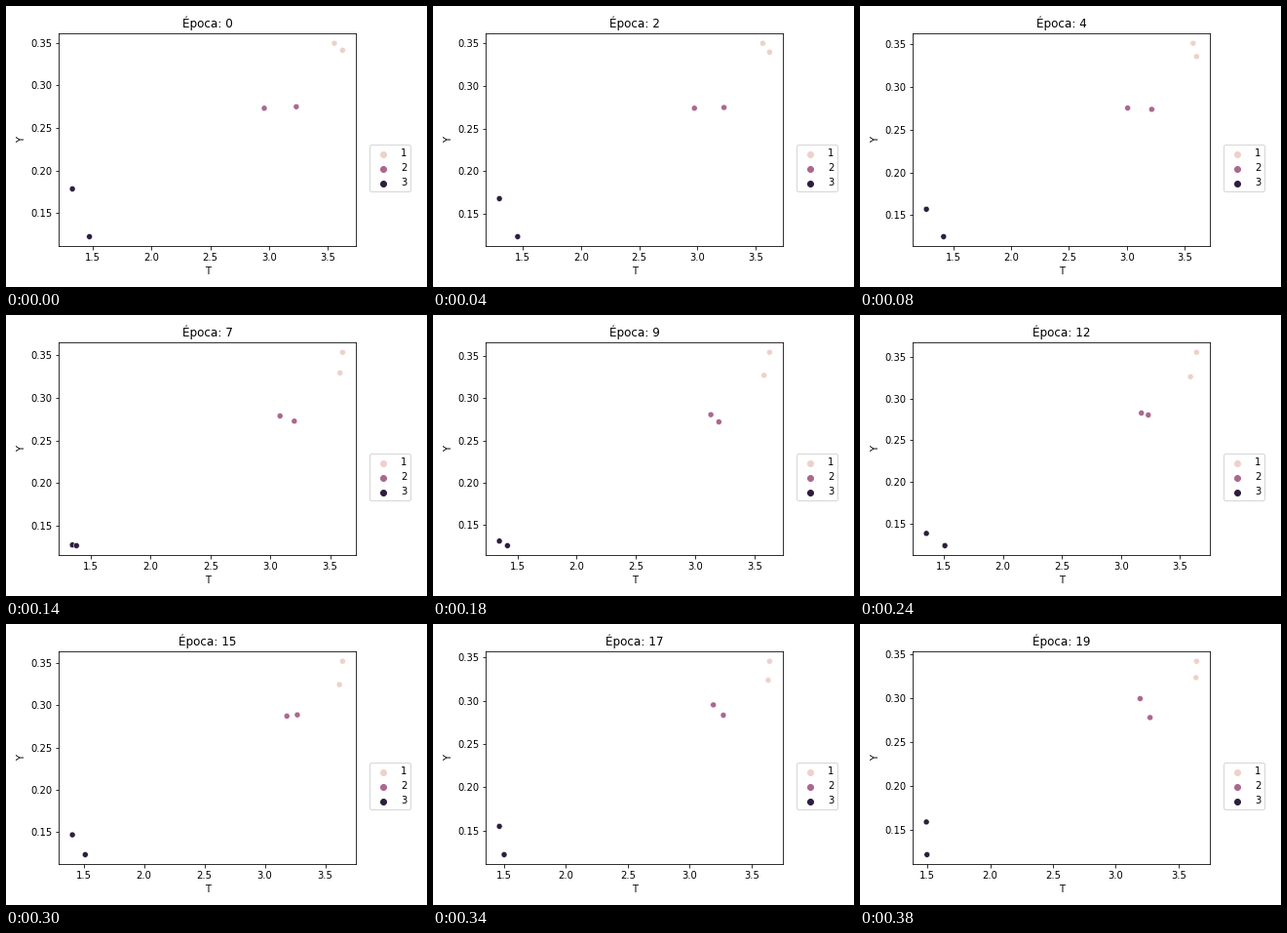
Write a matplotlib script that moves like this. It is 432 by 288 pixels and loops after 0.4 s.

```python
import matplotlib.pyplot as plt
import numpy as np
from matplotlib.animation import FuncAnimation
from matplotlib.ticker import MultipleLocator

W, H, DPI = 432, 288, 72
EPOCHS = 20
COLORS = {1: "#edd1cb", 2: "#aa688f", 3: "#2d1e3e"}

# Turning points of each dot as (epoch, T, Y), eased in between
PATHS = [
    (3, [(0, 1.330, .1782), (4, 1.269, .1570), (7, 1.347, .1276),
         (12, 1.353, .1380), (19, 1.492, .1589)]),
    (3, [(0, 1.475, .1220), (7, 1.381, .1268), (13, 1.520, .1230),
         (19, 1.497, .1217)]),
    (2, [(0, 3.231, .2750), (9, 3.196, .2722), (15, 3.269, .2887),
         (19, 3.274, .2778)]),
    (2, [(0, 2.959, .2732), (13, 3.178, .2830), (19, 3.195, .2994)]),
    (1, [(0, 3.554, .3497), (13, 3.643, .3560), (19, 3.645, .3419)]),
    (1, [(0, 3.624, .3415), (9, 3.576, .3273), (19, 3.640, .3233)]),
]

plt.rcParams["font.family"] = "DejaVu Sans"
fig = plt.figure(figsize=(W / DPI, H / DPI), dpi=DPI, facecolor="white")
ax = fig.add_axes([54.25 / W, 41.7 / H, 305 / W, 218 / H])
ax.set_xlabel("T")
ax.set_ylabel("Y")
ax.xaxis.set_major_locator(MultipleLocator(0.5))
ax.yaxis.set_major_locator(MultipleLocator(0.05))
title = ax.set_title("")

dots = ax.scatter(np.zeros(len(PATHS)), np.zeros(len(PATHS)), s=36,
                  c=[COLORS[group] for group, _ in PATHS],
                  edgecolors="white", linewidths=0.48)
for group, color in COLORS.items():
    ax.scatter([], [], color=color, label=str(group))
ax.legend(loc="upper left", bbox_to_anchor=(1.028, 0.5),
          scatteryoffsets=[0.32])


def position(path, epoch):
    for (e0, *start), (e1, *end) in zip(path, path[1:]):
        if epoch <= e1:
            break
    u = (epoch - e0) / (e1 - e0)
    return np.array(start) + np.subtract(end, start) * u * u * (3 - 2 * u)


def padded(values, margin=0.05):
    low, high = values.min(), values.max()
    pad = margin * (high - low)
    return low - pad, high + pad


def update(epoch):
    xy = np.array([position(path, epoch) for _, path in PATHS])
    dots.set_offsets(xy)
    ax.set_xlim(*padded(xy[:, 0]))
    ax.set_ylim(*padded(xy[:, 1]))
    title.set_text(f"Época: {epoch}")
    return dots, title


anim = FuncAnimation(fig, update, frames=EPOCHS, interval=20, repeat=True,
                     repeat_delay=0, blit=False)
plt.show()
```
